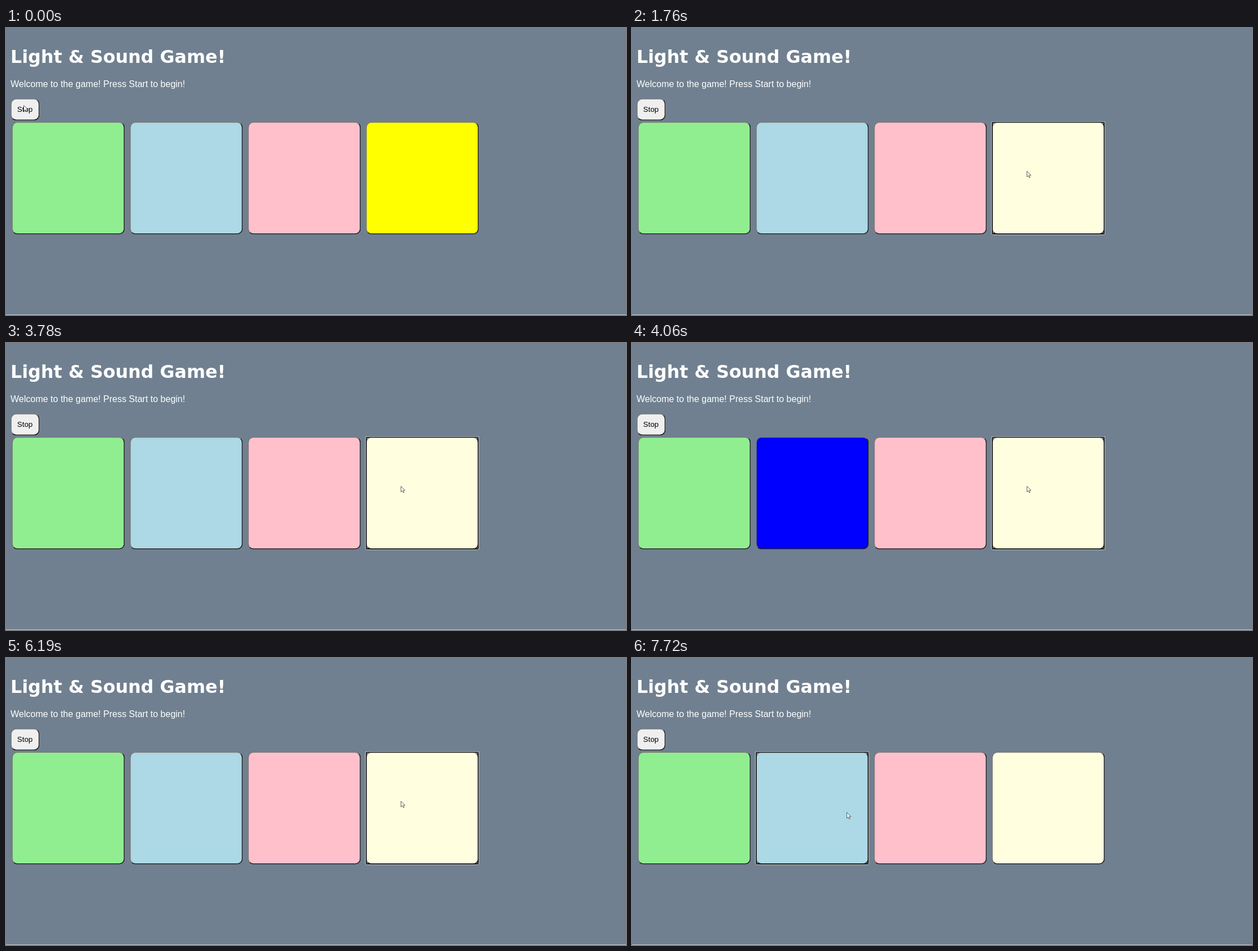
An HTML page that plays this animation: 1098x510 px, repeating every 8000 ms.

```html
<!DOCTYPE html>
<html lang="en">
<head>
<meta charset="utf-8">
<title>Light &amp; Sound Game</title>
<style>
html, body { margin: 0; width: 100%; height: 100%; overflow: hidden; background: #708090; }
body { position: relative; color: #fff; font: 16px/18px "Liberation Sans", Arial, sans-serif; }
body > * { position: absolute; margin: 0; box-sizing: border-box; white-space: nowrap; }
h1 { left: 8px; top: 32px; font: bold 31.7px/38px "DejaVu Sans", Verdana, sans-serif; }
p { left: 8px; top: 91px; }
/* Buttons are laid out on a 125% display and scaled back, which gives 1.6px borders. */
.button { left: 0; top: 0; border: 2px outset #767676; border-radius: 12.5px;
  transform-origin: 0 0; transform: translate(var(--x), var(--y)) scale(.8); }
.stop { --x: 8.2px; --y: 125.2px; width: 64px; height: 49px; padding: 12.5px;
  background: #efefef; color: #000; font-size: 16.667px; line-height: 20px; }
.pad { --y: 166.7px; width: 250px; height: 250px; background: var(--dim); }
.pad.lit { background: var(--bright); }
.pad.pressed { border-style: inset; }
.pad.focused::after { content: ""; position: absolute; inset: -2px; border: 2px solid #101010;
  border-radius: 2px; box-shadow: 0 0 0 1px #fff; }
.edge { left: 0; bottom: 0; width: 100%; height: 1px; background: #c3c8ce; }
#cursor { left: 0; top: 0; width: 9px; height: 14px; overflow: visible; }
</style>
</head>
<body>
<h1>Light &amp; Sound Game!</h1>
<p>Welcome to the game! Press Start to begin!</p>
<div class="button stop">Stop</div>
<div class="button pad" style="--x:10.2px;--dim:lightgreen;--bright:green"></div>
<div class="button pad" style="--x:219.2px;--dim:lightblue;--bright:blue"></div>
<div class="button pad" style="--x:428.2px;--dim:pink;--bright:red"></div>
<div class="button pad" style="--x:637.2px;--dim:lightyellow;--bright:yellow"></div>
<div class="edge"></div>
<svg id="cursor"><path d="M.5 .5V10.7L2.9 8.5 4.5 12 6.1 11.3 4.6 7.8H7.6Z" fill="#fff" stroke="#222" stroke-width=".7"/></svg>
<script>
const LOOP = 8000, BLUE = 1, YELLOW = 3;
const pads = [...document.querySelectorAll(".pad")];
const cursor = document.getElementById("cursor");

// Each flash: pad, start, end, and whether the player is pressing it.
const flashes = [
  [YELLOW, 0, 120], [YELLOW, 1110, 1760, true],
  [YELLOW, 2750, 3780], [BLUE, 4060, 5090],
  [YELLOW, 5760, 6190, true], [BLUE, 7040, 7720, true]
];
// Pointer tip: time, x, y. It jumps from stop to stop.
const stops = [
  [0, 31, 137], [120, 60, 121], [280, 240, 79], [400, 498, 158], [540, 534, 196],
  [810, 669, 230], [960, 699, 254], [6590, 538, 275], [6740, 401, 277], [6890, 380, 274]
];

function draw(now) {
  const t = now % LOOP;
  const focused = t < 1110 ? -1 : t < 7040 ? YELLOW : BLUE;
  const flash = flashes.find(([, start, end]) => t >= start && t < end) || [];
  pads.forEach((pad, i) => {
    const lit = flash[0] === i;
    pad.classList.toggle("lit", lit);
    pad.classList.toggle("pressed", lit && !!flash[3]);
    pad.classList.toggle("focused", focused === i);
  });
  const [, x, y] = stops.filter(stop => stop[0] <= t).pop();
  cursor.style.transform = `translate(${x}px, ${y}px)`;
}

const origin = performance.now();
function tick() {
  draw(performance.now() - origin);
  requestAnimationFrame(tick);
}
tick();
</script>
</body>
</html>
```
